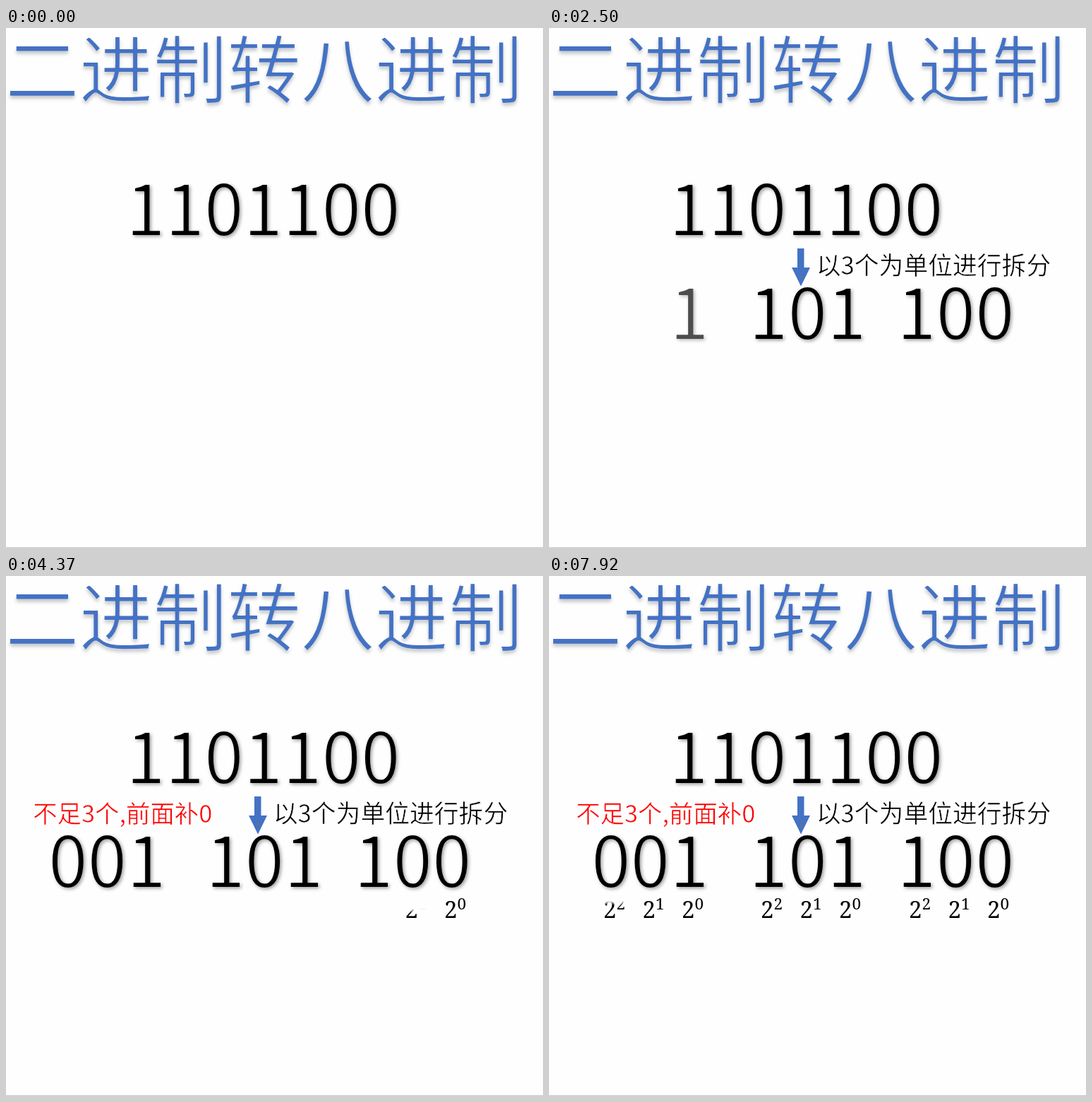
Animation of 761 by 736 pixels, one loop 7990 ms. Source, as an HTML page with a canvas:

```html
<!DOCTYPE html>
<html lang="zh-CN">
<head>
<meta charset="utf-8">
<title>二进制转八进制</title>
<style>
html, body { margin: 0; width: 100%; height: 100%; overflow: hidden; background: #fefefe; }
canvas { display: block; }
</style>
</head>
<body>
<canvas id="stage" width="761" height="736"></canvas>
<script>
const stage = document.getElementById('stage');
const ctx = stage.getContext('2d');
const LOOP = 7990;
const BLUE = '#4472c4';
const SANS = '"Noto Sans CJK SC", "Noto Sans CJK", sans-serif';
const SERIF = '"Noto Serif", serif';
const DIGIT = 55.5;

function newLayer() {
  const canvas = document.createElement('canvas');
  canvas.width = stage.width;
  canvas.height = stage.height;
  return canvas.getContext('2d');
}

// Text with its outline trimmed to a lighter weight, plus an optional soft shadow
function makeText(str, x, y, size, color, shadow) {
  const glyphs = newLayer();
  glyphs.font = `${size}px ${SANS}`;
  glyphs.fillStyle = color;
  glyphs.fillText(str, x, y);
  glyphs.globalCompositeOperation = 'destination-out';
  glyphs.lineWidth = size * 0.019;
  glyphs.lineJoin = 'round';
  glyphs.strokeText(str, x, y);

  const layer = newLayer();
  if (shadow) {
    layer.shadowColor = shadow.color;
    layer.shadowOffsetX = shadow.x;
    layer.shadowOffsetY = shadow.y;
    layer.shadowBlur = 5;
  }
  layer.drawImage(glyphs.canvas, 0, 0);
  return layer.canvas;
}

const digits = (str, x, y) =>
  makeText(str, x, y, 100, '#000', { color: 'rgba(0,0,0,.4)', x: 2, y: 2 });

const title = makeText('二进制转八进制', -0.9, 98.3, 104.7, BLUE,
  { color: 'rgba(110,116,122,.43)', x: 0, y: 3.9 });
const binary = digits('1101100', 170, 294);
const splitNote = makeText('以3个为单位进行拆分', 378.7, 348.5, 34.8, '#000');

const groupX = [493, 283, 60];
const rowY = 440.5;
const reveals = [
  digits('100', groupX[0], rowY),
  digits('101', groupX[1], rowY),
  digits('1', groupX[2] + 2 * DIGIT, rowY),
  makeText('不足3个,前面补0', 38.2, 348.5, 34.4, '#f00'),
  digits('00', groupX[2], rowY)
];

// Effects follow one another at an even pace
const progress = (t, order) => Math.max(0, Math.min(1, (t - 1170 - 492 * order) / 500));

function show(layer, alpha = 1) {
  ctx.globalAlpha = alpha;
  ctx.drawImage(layer, 0, 0);
  ctx.globalAlpha = 1;
}

function drawArrow(alpha) {
  ctx.globalAlpha = alpha;
  ctx.fillStyle = BLUE;
  ctx.fill(new Path2D('M352 312H361.5V339H370L357 365.5L344 339H352Z'));
  ctx.fillStyle = '#66708f';
  ctx.fillRect(355.5, 350, 3, 4);
  ctx.globalAlpha = 1;
}

// A power of two, wiped in upwards with a soft edge
function drawPower(exponent, x, amount) {
  const edge = 497 - 52 * amount;
  const wipe = ctx.createLinearGradient(0, edge, 0, edge + 6);
  wipe.addColorStop(0, 'rgba(0,0,0,0)');
  wipe.addColorStop(1, '#000');
  ctx.fillStyle = wipe;
  ctx.font = `33px ${SERIF}`;
  ctx.fillText('2', x, 484);
  ctx.font = `22.5px ${SERIF}`;
  ctx.fillText(exponent, x + 18.5, 471.5);
}

function draw(t) {
  ctx.fillStyle = '#fefefe';
  ctx.fillRect(0, 0, stage.width, stage.height);
  ctx.fillStyle = '#c4c4c4';
  ctx.fillRect(0, 735, stage.width, 1);

  show(title);
  show(binary);
  drawArrow(progress(t, -1.5));
  show(splitNote, progress(t, -1));
  reveals.forEach((layer, i) => show(layer, progress(t, i)));

  for (let i = 0; i < 9; i++) {
    const exponent = i % 3;
    const x = groupX[Math.floor(i / 3)] + 128 - exponent * DIGIT;
    drawPower(exponent, x, progress(t, reveals.length + i));
  }
}

function frame() {
  draw(performance.now() % LOOP);
  requestAnimationFrame(frame);
}
frame();
</script>
</body>
</html>
```
